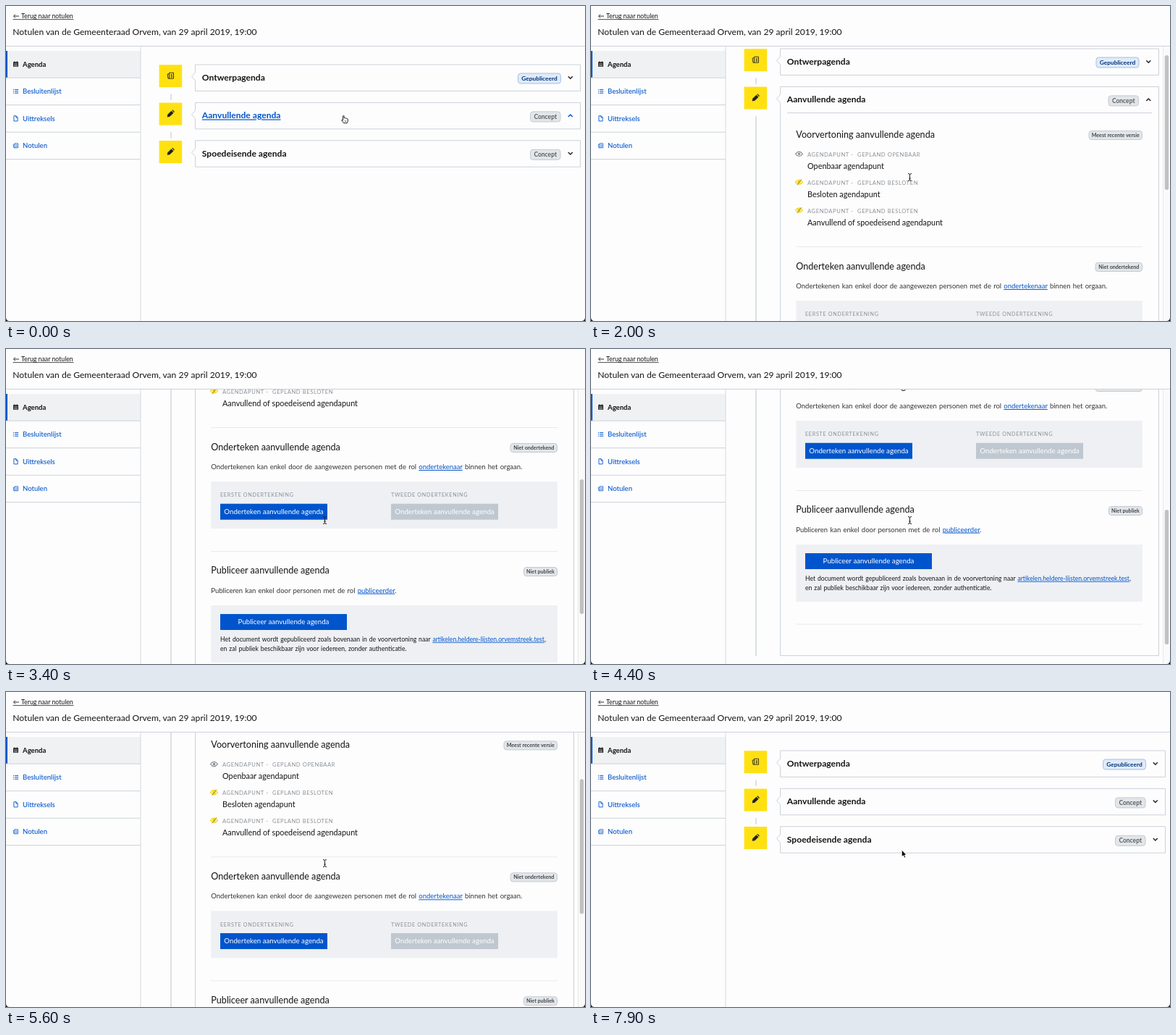
Write an HTML page that moves like this. It is 800 px wide and 435 px high and loops after 8 s.

```html
<!DOCTYPE html>
<html lang="nl">
<head>
<meta charset="utf-8">
<title>Agenda</title>
<style>
html, body { margin: 0; width: 100%; height: 100%; overflow: hidden; background: #fdfdfd; }
svg { display: block; font-family: Lato, "Open Sans", sans-serif; fill: none; }
text { fill: #151515; white-space: pre; }
.title { font-size: 12.1px; }
.back { font-size: 8.75px; }
.nav { font-size: 9.55px; font-weight: 500; fill: #05c; }
.nav.on { fill: #111; font-weight: 700; }
.card { font-size: 12.1px; font-weight: 700; }
.head { font-size: 12.6px; }
.item { font-size: 10.85px; }
.label { font-size: 7.65px; letter-spacing: .56px; fill: #8b9197; }
.label.sign { font-size: 7.2px; letter-spacing: .7px; }
.body { font-size: 9.5px; word-spacing: .8px; fill: #333; }
.note { font-size: 8.65px; word-spacing: .7px; }
.btn { font-size: 9.7px; fill: #fff; text-anchor: middle; }
.pill { font-size: 8.5px; font-weight: 700; text-anchor: middle; fill: #5a5f64; }
.pill.small { font-size: 7.15px; fill: #44484c; }
.pill.blue { font-size: 8.35px; fill: #00337a; }
.link { fill: #05c; text-decoration: underline; }
.line { stroke: #cbd2da; }
.soft { stroke: #e7eaed; }
.chevron { stroke: #222; stroke-width: 1.4; }
.hover .card { fill: #05c; text-decoration: underline; }
.hover .chevron { stroke: #05c; }
</style>
</head>
<body>
<svg id="stage" width="800" height="435"></svg>
<script>
const BLUE = '#0055cc', YELLOW = '#ffe112', PALE = '#eef0f3';
const text = (x, y, s, cls) => `<text x="${x}" y="${y}" class="${cls}">${s}</text>`;
const rect = (x, y, w, h, fill, more = '') =>
  `<rect x="${x}" y="${y}" width="${w}" height="${h}" fill="${fill}" ${more}/>`;
const path = (d, more) => `<path d="${d}" ${more}/>`;
const group = (id, s, more = '') => `<g id="${id}" ${more}>${s}</g>`;
const at = (x, y, s) => `<g transform="translate(${x} ${y})">${s}</g>`;
const link = s => `<tspan class="link">${s}</tspan>`;
const rule = (x1, x2, y, cls = 'line') => path(`M${x1} ${y}H${x2}`, `class="${cls}"`);

const pill = (x, y, w, h, s, cls = '') => {
  const blue = cls === 'blue';
  return rect(x, y, w, h, blue ? '#e0ebf9' : '#e3e6e9',
    `rx="3.5" stroke="${blue ? '#a6c1e3' : '#c3cad1'}"`) +
    text(x + w / 2, y + h / 2 + (cls === 'small' ? 2.6 : 3.1), s, 'pill ' + cls);
};

// Icons, drawn around their centre
const pages = (c, w) => path('M-2 -4H4V4H-2ZM-2 -2.5L-4.5 -2L-3.5 4H-2M0 -1.5H2.5M0 .3H2.5M0 2H2.5',
  `stroke="${c}" stroke-width="${w}"`);
const pencil = path('M-4.8 4.8L-4.2 1.2L1 -3.8L4 -.8L-1.2 4.2ZM1.8 -4.4L2.8 -5.3L5.4 -2.6L4.6 -1.6Z', 'fill="#222"');
const calendar = path('M-3.5 -3H3.5V3.5H-3.5Z', 'fill="#222"') +
  path('M-2.5 -.6H2.5M-2.5 1H2.5M-2.5 2.5H2.5', 'stroke="#ddd" stroke-width=".6"') +
  path('M-1.7 -4V-2M1.7 -4V-2', 'stroke="#222"');
const list = path('M-3.6 -2.4h1.2M-3.6 0h1.2M-3.6 2.4h1.2M-1.4 -2.4H3.6M-1.4 0H3.6M-1.4 2.4H3.6',
  `stroke="${BLUE}"`);
const sheet = path('M-2.6 -3.6H.6L2.6 -1.4V3.6H-2.6ZM.4 -3.4V-1.2H2.6', `stroke="${BLUE}" stroke-width=".9"`);
const eye = (c, hidden) =>
  path('M-5 0Q0 -6.4 5 0Q0 6.4 -5 0Z', `stroke="${c}" stroke-width="1.2"`) +
  `<circle r="${hidden ? 2.4 : 1.8}" fill="${c}"/>` +
  (hidden ? path('M-2.8 4L3.4 -4', 'stroke="#8a7d30" stroke-width=".9"') : '');

const nav = [['Agenda', calendar], ['Besluitenlijst', list], ['Uittreksels', sheet],
  ['Notulen', `<g transform="scale(.75)">${pages(BLUE, 1)}</g>`]];

const sidebar = rect(0, 55, 186, 380, '#fdfdfd') + rect(0, 62, 186, 37, '#eff1f3') +
  rect(0, 62, 2, 37, BLUE) + path('M186 55V435', 'class="line" stroke-width=".8"') +
  nav.map(([s, icon], i) => {
    const y = 80.3 + i * 37.5;
    return at(13.5, y, icon) + text(23, y + 3.5, s, i ? 'nav' : 'nav on') + rule(0, 186, y + 18.9);
  }).join('');

const header = rect(0, -40, 800, 95, '#fdfdfd') +
  path('M18 14H10.5M13 11.6L10.5 14L13 16.4', 'stroke="#222" stroke-width=".9"') +
  text(21, 17, 'Terug naar notulen', 'back') + path('M9.5 18.6H93.5', 'stroke="#222" stroke-width=".8"') +
  text(9.3, 40, 'Notulen van de Gemeenteraad Orvem, van 29 april 2019, 19:00', 'title') +
  rule(0, 800, 55.4);

// Card header at y = 0; the frame is drawn per state
const cardHead = (icon, title, badge) =>
  rect(211.6, .2, 31.6, 31, YELLOW) + at(227.5, 15.2, icon) +
  text(270.8, 22, title, 'card') +
  `<g class="right">${badge}<path class="chevron"/></g>`;
const frame = (w, h) => path(`M261.5 0H${261.5 + w}V${h}H261.5V22L256.5 16.5L261.5 11Z`,
  'class="line" fill="#fdfdfd"');
const stub = y => path(`M228 ${y}v8.5`, 'stroke="#dde1e5" stroke-width="2"');
const concept = pill(724.5, 12.5, 41.5, 14, 'Concept');
const wide = s => `<g class="wide">${s}</g>`;
const narrow = s => `<g class="narrow">${s}</g>`;
const frames = (h = 36.4) => wide(frame(532, 36.4)) + narrow(frame(523, h));

const item = (y, kind, s, hidden) =>
  at(287.5, y - 3.7, eye(hidden ? '#f2d412' : '#8b9197', hidden)) +
  text(299, y, 'AGENDAPUNT -', 'label') + text(368, y, 'GEPLAND ' + kind, 'label') +
  text(299, y + 17, s, 'item');
const button = (x, y, w, s, fill = BLUE) =>
  rect(x, y, w, 22, fill) + text(x + w / 2, y + 14.3, s, 'btn');

const detail = rule(271, 775, 169.7) +
  path('M228 174V754', 'stroke="#dde1e5" stroke-width="2"') +
  text(283.3, 203.7, 'Voorvertoning aanvullende agenda', 'head') +
  pill(688, 194.5, 73.5, 12, 'Meest recente versie', 'small') +
  item(230, 'OPENBAAR', 'Openbaar agendapunt') +
  item(269, 'BESLOTEN', 'Besloten agendapunt', true) +
  item(307.7, 'BESLOTEN', 'Aanvullend of spoedeisend agendapunt', true) +
  rule(283, 762, 354.5, 'soft') +
  text(283.3, 385.7, 'Onderteken aanvullende agenda', 'head') +
  pill(697, 376.5, 64.5, 12, 'Niet ondertekend', 'small') +
  text(283.3, 412, `Ondertekenen kan enkel door de aangewezen personen met de rol ${link('ondertekenaar')} binnen het orgaan.`, 'body') +
  rect(283.5, 429, 478.5, 65, PALE) +
  text(296, 450.3, 'EERSTE ONDERTEKENING', 'label sign') +
  text(532, 450.3, 'TWEEDE ONDERTEKENING', 'label sign') +
  button(296, 459.7, 148, 'Onderteken aanvullende agenda') +
  button(532, 459.7, 148, 'Onderteken aanvullende agenda', '#bfc8d0') +
  rule(283, 762, 525.5, 'soft') +
  text(283.3, 556.3, 'Publiceer aanvullende agenda', 'head') +
  pill(715.5, 547.5, 46, 12, 'Niet publiek', 'small') +
  text(283.3, 582.6, `Publiceren kan enkel door personen met de rol ${link('publiceerder')}.`, 'body') +
  rect(283.5, 600, 478.5, 79, PALE) +
  button(296, 612, 175, 'Publiceer aanvullende agenda') +
  text(296, 649.8, `Het document wordt gepubliceerd zoals bovenaan in de voorvertoning naar ${link('artikelen.heldere-lijsten.orvemstreek.test')},`, 'note') +
  text(296, 662.6, 'en zal publiek beschikbaar zijn voor iedereen, zonder authenticatie.', 'note') +
  rule(283, 762, 710, 'soft');

const content = stub(121.5) +
  at(0, 81, frames() + cardHead(pages('#222', .9), 'Ontwerpagenda', pill(707.5, 12, 59, 14, 'Gepubliceerd', 'blue'))) +
  group('second', at(0, 133.4, frames(620) + cardHead(pencil, 'Aanvullende agenda', concept))) +
  group('detail', detail) +
  group('third', wide(stub(174)) + at(0, 185.8, frames() + cardHead(pencil, 'Spoedeisende agenda', concept)));

const cursors =
  group('arrow', path('M0 0V9.6L2.2 7.6L3.8 11L5.4 10.3L3.9 7H6.6Z', 'fill="#000" stroke="#fff" stroke-width=".8"')) +
  group('beam', path('M-2.5 -5Q0 -5 0 -3.5V3.5Q0 5 -2.5 5M2.5 -5Q0 -5 0 -3.5V3.5Q0 5 2.5 5M-1.3 1.5H1.3', 'stroke="#222"')) +
  group('hand', path('M-2.4 1V-4.2Q-1.6 -5.4 -.8 -4.2V-1.2Q.3 -2 1.1 -.9Q2.2 -1.5 2.8 -.4Q4.2 -.8 4.3 .8V3L3.3 5.6H-1.4L-4.2 1.8Q-4.2 .2 -2.4 1.8Z',
    'fill="#fff" stroke="#222" stroke-width="1"') + path('M.2 2.2V4M1.6 2.2V4', 'stroke="#222" stroke-width=".6"'));

document.getElementById('stage').innerHTML =
  '<clipPath id="view"><path d="M187 55.8H800V435H187Z"/></clipPath>' +
  rect(0, 0, 800, 435, '#fdfdfd') +
  group('page', `<g clip-path="url(#view)">${group('content', content)}</g>` + sidebar + header +
    group('bar', rect(790.5, 56, 9.5, 400, '#fafafa') + path('M790.5 56V456', 'stroke="#e8e8e8"') +
      group('thumb', rect(792.8, 57, 5.4, 186, '#c1c1c1', 'rx="2.7"')))) +
  path('M0 430Q0 435 5 435H0ZM800 430Q800 435 795 435H800Z', 'fill="#111"') + cursors;

const $ = id => document.getElementById(id);
const show = (el, on) => { el.style.display = on ? '' : 'none'; };
const move = (el, x, y) => el.setAttribute('transform', `translate(${x} ${y})`);
const each = (sel, fn) => document.querySelectorAll(sel).forEach(fn);

// Linear interpolation through [time, value] pairs
function track(keys, t) {
  const i = keys.findIndex(k => k[0] > t);
  if (i === 0) return keys[0][1];
  if (i < 0) return keys[keys.length - 1][1];
  const [t0, a] = keys[i - 1], [t1, b] = keys[i];
  return a + (b - a) * (t - t0) / (t1 - t0);
}

const scrollKeys = [[1600, 0], [2000, 22], [2500, 62], [2900, 119.5], [3400, 246], [3700, 290],
  [4200, 330], [4800, 330], [5300, 297], [5500, 190], [5800, 0]];
const bounceKeys = [[5800, 0], [5900, 16], [6100, 6], [6400, 1.3], [6600, 0]];
const xKeys = [[500, 468], [800, 452], [1200, 440.5], [6500, 440.5], [6800, 435], [7200, 435], [7500, 429.3]];
const yKeys = [[500, 156], [800, 190], [1200, 236.5], [6500, 236.5], [6800, 153], [7200, 153], [7500, 218]];

function draw(now) {
  const t = Math.floor(now % 8000 / 100) * 100;
  const open = t >= 100 && t < 7000;
  const hover = t < 600 || t >= 6800 && t < 7300;
  const scroll = open ? track(scrollKeys, t) : 0;

  move($('page'), 0, track(bounceKeys, t));
  move($('content'), 0, -scroll);
  move($('thumb'), 0, scroll / 2);
  move($('third'), 0, open ? 583 : 0);
  show($('detail'), open);
  show($('bar'), open);
  each('.wide', el => show(el, !open));
  each('.narrow', el => show(el, open));
  each('.right', el => move(el, open ? -9.5 : 0, 0));
  each('.chevron', (el, i) => {
    const up = i === 1 && (open || t < 100);
    el.setAttribute('d', up ? 'M776.8 19.6l3 -3 3 3' : 'M776.8 16.2l3 3 3 -3');
  });
  $('second').classList.toggle('hover', hover);

  const kind = hover ? 'hand' : t >= 1700 && t < 5900 ? 'beam' : 'arrow';
  for (const id of ['arrow', 'beam', 'hand']) {
    show($(id), id === kind);
    move($(id), track(xKeys, t), track(yKeys, t));
  }
}

const start = performance.now();
function tick() {
  draw(performance.now() - start);
  requestAnimationFrame(tick);
}
tick();
</script>
</body>
</html>
```
